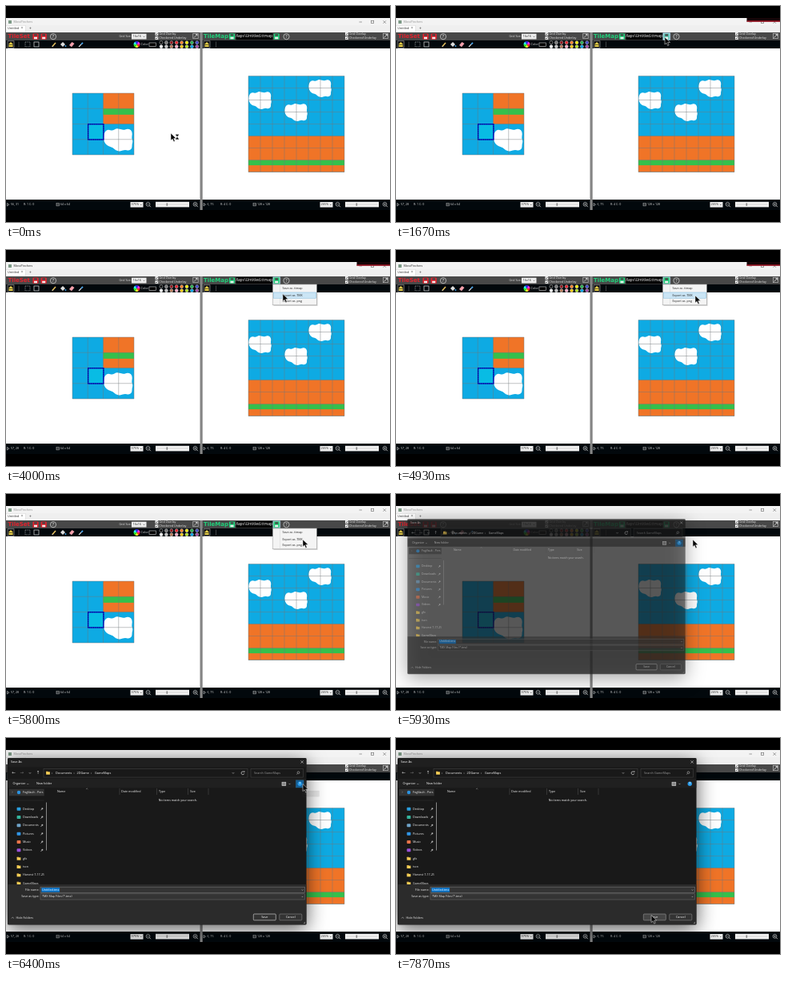
These frames come from a looping animation (480 by 270 pixels, 8 s). An HTML page with a canvas:

```html
<!DOCTYPE html>
<html lang="en">
<head>
<meta charset="utf-8">
<title>Tile editor export</title>
<style>
html, body { margin: 0; width: 100%; height: 100%; overflow: hidden; background: #000; }
canvas { display: block; width: 480px; height: 270px; }
</style>
</head>
<body>
<canvas id="stage"></canvas>
<script>
const LOOP = 8000, FPS = 15;
const UI = '"Open Sans", sans-serif', LOGO = '"DejaVu Sans", sans-serif';
const SKY = '#0eaae3', SOIL = '#f07427', GRASS = '#35bf4c', RED = '#e3202c', GREEN = '#1fd07a', BAR = '#02080c';
const canvas = document.getElementById('stage');
const c = canvas.getContext('2d');
const dpr = window.devicePixelRatio || 1;
canvas.width = 480 * dpr;
canvas.height = 270 * dpr;

function box(x, y, w, h, fill, stroke, lw = 0.6) {
  if (fill) { c.fillStyle = fill; c.fillRect(x, y, w, h); }
  if (stroke) { c.strokeStyle = stroke; c.lineWidth = lw; c.strokeRect(x, y, w, h); }
}
function round(x, y, w, h, r, fill, stroke) {
  c.beginPath();
  c.roundRect(x, y, w, h, r);
  if (fill) { c.fillStyle = fill; c.fill(); }
  if (stroke) { c.strokeStyle = stroke; c.lineWidth = 0.6; c.stroke(); }
}
function text(s, x, y, color = '#fff', size = 3.8, align = 'left', font = UI, weight = 400) {
  c.font = `${weight} ${size}px ${font}`;
  c.textAlign = align;
  c.textBaseline = 'middle';
  c.fillStyle = color;
  c.fillText(s, x, y);
}
function line(color, lw, ...p) {
  c.strokeStyle = color;
  c.lineWidth = lw;
  c.beginPath();
  for (let i = 0; i < p.length; i += 2) c.lineTo(p[i], p[i + 1]);
  c.stroke();
}
function disc(x, y, r, fill, stroke, lw = 0.7) {
  c.beginPath();
  c.arc(x, y, r, 0, 7);
  if (fill) { c.fillStyle = fill; c.fill(); }
  if (stroke) { c.strokeStyle = stroke; c.lineWidth = lw; c.stroke(); }
}
function poly(fill, ...p) {
  c.fillStyle = fill;
  c.beginPath();
  for (let i = 0; i < p.length; i += 2) c.lineTo(p[i], p[i + 1]);
  c.closePath();
  c.fill();
}
const chevron = (x, y, color, s = 1.2) => line(color, 0.6, x - s, y - s / 2, x, y + s / 2, x + s, y - s / 2);

// Artwork
const PUFF = [[.01, .38], [.06, .23], [.16, .18], [.3, .22], [.43, .14], [.56, .17], [.68, .2], [.78, .15], [.91, .19],
  [.95, .32], [.92, .45], [.97, .57], [.93, .67], [.94, .79], [.83, .87], [.7, .83], [.57, .89], [.4, .86],
  [.32, .76], [.18, .73], [.07, .65], [.01, .5]];
function cloud(x, y, s) {
  const n = PUFF.length, at = i => [x + PUFF[i % n][0] * s, y + PUFF[i % n][1] * s];
  c.fillStyle = '#fff';
  c.beginPath();
  for (let i = 0; i <= n; i++) {
    const [ax, ay] = at(i), [bx, by] = at(i + 1);
    c.quadraticCurveTo(ax, ay, (ax + bx) / 2, (ay + by) / 2);
  }
  c.fill();
}
function grid(x, y, size, n) {
  for (let i = 0; i <= n; i++) {
    const d = size * i / n;
    line('rgba(112,118,122,.75)', 0.6, x + d, y, x + d, y + size);
    line('rgba(112,118,122,.75)', 0.6, x, y + d, x + size, y + d);
  }
}
function tileSet() {
  const x = 83, y = 109, s = 77, t = s / 4;
  box(x, y, s, s, SKY);
  box(x + 2 * t, y, 2 * t, 2 * t, SOIL);
  box(x + 2 * t, y + t, 2 * t, 7.6, GRASS);
  cloud(x + 2 * t, y + 2 * t, 2 * t);
  grid(x, y, s, 4);
  box(x + t + .4, y + 2 * t + .2, t, t, '#08bce4', '#0614c8', 1.4);
  c.setLineDash([1, 1.4]);
  box(x + t + .4, y + 2 * t + .2, t, t, null, '#04086a', 1);
  c.setLineDash([]);
}
function tileMap() {
  const x = 303, y = 87.5, s = 120, t = s / 8;
  box(x, y, s, s, SKY);
  box(x, y + 5 * t, s, 3 * t, SOIL);
  box(x, y + 7 * t + .2, s, 6.4, GRASS);
  cloud(x, y + t, 2 * t);
  cloud(x + 3 * t, y + 2 * t, 2 * t);
  cloud(x + 5 * t, y, 2 * t);
  grid(x, y, s, 8);
}

// Editor window
function floppy(x, y, color) {
  round(x - 3.6, y - 3.6, 7.2, 7.2, 1, color);
  box(x - 1.9, y - 3, 3.8, 2.3, '#444');
  box(x - 2, y + .6, 4, 2.4, '#eee');
}
function help(x, y) {
  disc(x, y, 3.6, null, '#ddd', .7);
  text('?', x, y + .1, '#eee', 5.5, 'center');
}
function options(x) {
  ['Grid Overlay', 'Checkered Underlay'].forEach((s, i) => {
    const y = 35 + i * 5;
    box(x, y - 1.9, 3.8, 3.8, '#f4f4f4');
    line('#222', .6, x + .8, y, x + 1.6, y + 1, x + 3, y - 1);
    text(s, x + 5, y, '#eee', 3.6);
  });
}
function expand(x) {
  box(x - 3.2, 34.3, 6.4, 6.4, null, '#ccc', .6);
  line('#eee', .7, x - 2, 39.5, x + 2, 35.5);
  line('#eee', .7, x, 35.5, x + 2, 35.5, x + 2, 37.5);
}
function stamp(x) {
  box(x - 4, 43.8, 8, 8.6, '#111', '#aaa', .6);
  poly('#e7d04a', x - 3, 48, x, 45, x + 3, 48);
  box(x - 2.6, 48.6, 5.2, 2.4, '#e7d04a');
}
function zoom(x, sign) {
  disc(x, 247.8, 2.4, null, '#ccc', .7);
  line('#ccc', .9, x + 1.8, 249.6, x + 3.4, 251.2);
  line('#ccc', .6, x - 1.2, 247.8, x + 1.2, 247.8);
  if (sign > 0) line('#ccc', .6, x, 246.6, x, 249);
}
function status(x, pos, cell, cellX, size, sizeX, pct, pctX) {
  line('#ccc', .6, x + 1.5, 246.4, x + 4, 248.2, x + 1.5, 250, x + 1.5, 246.4);
  text(pos, x + 6, 248.3, '#ddd', 3.6);
  text(cell, cellX, 248.3, '#ddd', 3.6);
  box(sizeX, 246.5, 3.6, 3.4, null, '#ccc', .5);
  line('#ccc', .5, sizeX, 248.2, sizeX + 3.6, 248.2);
  text(size, sizeX + 5, 248.3, '#ddd', 3.6);
  box(pctX, 245, 16, 6.6, '#eee');
  text(pct, pctX + 1, 248.4, '#222', 3.8);
  chevron(pctX + 13.3, 248.3, '#333', 1);
  zoom(pctX + 22, -1);
  box(pctX + 31.5, 244.8, 42, 6.6, '#f2f2f2');
  line('#c4c4c4', .7, pctX + 33, 248, pctX + 72, 248);
  box(pctX + 45, 246.4, 1.6, 3.4, '#888');
  zoom(pctX + 81, 1);
}
const PALETTE = ['#000', '#777', '#8b1018', '#e8222b', '#ff7f27', '#fff200', '#22b14c', '#3f48cc',
  '#fff', '#c3c3c3', '#b97a57', '#ffaec9', '#ffc90e', '#b5e61d', '#00a2e8', '#a349a4'];

function toolIcons() {
  c.setLineDash([1, .8]);
  box(24, 45, 6, 6, null, '#ccc', .6);
  c.setLineDash([]);
  box(35, 45, 6, 6, null, '#ddd', .7);
  line('#e4c060', 1.6, 58, 50.5, 62, 46);
  line('#eee', .8, 57.5, 51, 58.5, 50);
  poly('#ddd', 68, 48, 71, 45, 74, 48, 71, 51);
  disc(74.5, 50, .9, '#3aa0e8');
  poly('#f3a0ac', 79, 49, 82.5, 45, 85.5, 47, 82, 51.2);
  line('#ddd', 1.1, 91, 51, 94, 48);
  line('#4aa4ea', 1.8, 94, 48, 96, 45.8);
}

function editor(t) {
  const active = t >= 2600 && t < 5660;
  const rec = t >= 330 && t < 5660;
  const menu = t >= 2660 && t < 5925;
  const hover = t >= 1300 && t < 2660;

  box(0, 15, 480, 9, '#f3f3f3');
  box(0, 24, 480, 9, '#efefef');
  box(3, 18, 4, 4, '#7d9a86');
  text('MossPinchers', 9.5, 20.2, active ? '#222' : '#909090', 3.7);
  line('#666', .6, 441.5, 20, 445, 20);
  box(456.5, 18.3, 3.2, 3.2, null, '#666', .6);
  line('#666', .6, 471.5, 18.3, 475, 21.8);
  line('#666', .6, 471.5, 21.8, 475, 18.3);
  if (rec) {
    box(438.5, 15, 41.5, 4.6, '#160508');
    box(438.5, 18.4, 41.5, 1.2, '#c01428');
  }
  box(0, 24.3, 24.5, 8.7, '#fff', '#ccc', .4);
  text('Untitled', 2, 28.4, '#222', 3.8);
  text('×', 20, 28.2, '#555', 4.5, 'center');
  text('+', 30.5, 28.2, '#333', 5, 'center');

  box(0, 33, 480, 10, '#484848');
  box(0, 43, 480, 10, BAR);
  box(0, 53, 480, 189, '#fff');
  box(0, 242, 480, 13, BAR);
  box(242.5, 33, 3.2, 222, '#858585');

  text('TileSet', 2.5, 38.3, RED, 7, 'left', LOGO, 700);
  floppy(37, 38.2, RED);
  floppy(47.2, 38.2, RED);
  help(59, 38.2);
  text('Grid Size:', 141.5, 38.2, '#ddd', 3.5);
  box(157, 34.7, 18.5, 6.8, '#eee');
  text('16x16', 158.5, 38.2, '#222', 3.8);
  chevron(172.5, 38.2, '#333', 1);
  options(186.5);
  expand(237);

  text('TileMap', 247, 38.3, GREEN, 7, 'left', LOGO, 700);
  floppy(282.5, 38.2, GREEN);
  c.save();
  box(287.5, 34, 46, 8.3, '#000');
  c.beginPath();
  c.rect(287.5, 34, 45.5, 8.3);
  c.clip();
  text('\\Maps\\Untitled.ttmap', 333, 38.2, '#fff', 4.9, 'right');
  c.restore();
  if (hover || menu) box(333.8, 33.8, 9, 8.6, hover ? '#c6e6f5' : '#a9d9c5', '#8cc0dc', .5);
  floppy(338.2, 38.2, hover ? '#5bc8b4' : GREEN);
  help(350.5, 38.2);
  options(424);
  expand(474.5);

  stamp(6);
  line('#666', .6, 16, 44.5, 16, 52);
  toolIcons();
  for (let i = 0; i < 6; i++) {
    c.beginPath();
    c.moveTo(163.5, 48);
    c.arc(163.5, 48, 4, i * Math.PI / 3, (i + 1) * Math.PI / 3);
    c.fillStyle = `hsl(${i * 60},85%,55%)`;
    c.fill();
  }
  text('Color', 168.5, 48.1, '#ddd', 3.8);
  box(179, 46, 8.5, 4.6, '#000', '#ccc', .6);
  PALETTE.forEach((p, i) => disc(194 + i % 8 * 6.4, i < 8 ? 45.7 : 50.7, 2, p, '#ddd', .5));
  stamp(251);
  line('#666', .6, 262.5, 44.5, 262.5, 52);

  tileSet();
  tileMap();
  status(0, t < 130 ? '56, 31' : '57, 28', 'R: 1 C: 0', 22, '64 x 64', 63, '375%', 155.5);
  status(245.5, '6, 75', 'R: 4 C: 0', 268, '128 x 128', 309, '265%', 392.5);
  if (menu) exportMenu(t);
}

function exportMenu(t) {
  box(334.5, 44, 55, 26, 'rgba(0,0,0,.18)');
  box(333.5, 43, 54.8, 25.8, '#f4f4f4', '#a5a5a5', .6);
  line('#d8d8d8', .5, 342.5, 43.5, 342.5, 68.5);
  if (t >= 3660 && t < 5660) box(334.3, 53, 53.4, 7.2, '#cbe5f5', '#7db6da', .5);
  ['Save as .ttmap', 'Export as .TMX', 'Export as .png'].forEach((s, i) =>
    text(s, 345.5, [47.7, 56.6, 64][i], '#222', 3.7));
}

// Save dialog
function folder(x, y) {
  box(x - 2.4, y - 2, 2.4, 1.2, '#e0a830');
  box(x - 2.4, y - 1.4, 4.8, 3.4, '#f6cf57');
}
const PLACES = [['Desktop', '#2a9fe0'], ['Downloads', '#35b49c'], ['Documents', '#6fa3c8'], ['Pictures', '#3196e6'],
  ['Music', '#e8744a'], ['Videos', '#9a50d8'], ['gfx'], ['tscn'], ['Harvest 7-17-25'], ['GameMaps']];

function sidebar() {
  c.save();
  c.beginPath();
  c.rect(2, 62, 45.7, 121);
  c.clip();
  box(4, 63.7, 45, 8.6, '#333');
  text('›', 8, 67.6, '#aaa', 4.5, 'center');
  disc(16, 68, 2.2, '#2a92e0');
  text('FogVault - Pers', 21, 68, '#eee', 3.7);
  line('#333', .5, 4, 78, 48, 78);
  PLACES.forEach(([name, color], i) => {
    const y = 88.7 + i * 10.33;
    if (color) {
      round(13.6, y - 2, 4.8, 4, .8, color);
      line('#bbb', .8, 43.5, y + 1.6, 45.2, y - .2);
      disc(45.4, y - .5, 1, '#bbb');
    } else folder(16, y);
    text(name, 21, y, '#eee', 3.7);
  });
  c.restore();
  box(50, 80.5, 1, 60, '#888');
}

function dialog(t) {
  const k = Math.round((t - 5933) * FPS / 1000);
  const scale = [.93, .976, .99, .997][k] || 1;
  c.save();
  c.globalAlpha = k < 1 ? .55 : 1;
  c.translate(178, 114);
  c.scale(scale, scale);
  c.translate(-178, -114);
  c.shadowColor = 'rgba(0,0,0,.65)';
  c.shadowBlur = 24 * dpr;
  c.shadowOffsetY = 5 * dpr;
  round(2, 25, 373.5, 208.5, 1.5, '#191919');
  c.shadowColor = 'transparent';
  c.shadowBlur = c.shadowOffsetY = 0;
  box(2.3, 25.4, 373, 11, '#1f1f1f');
  text('Save As', 6, 30.2, '#fff', 3.9);
  line('#ddd', .6, 368.5, 28.3, 371.8, 31.6);
  line('#ddd', .6, 368.5, 31.6, 371.8, 28.3);

  ['←', '→', '', '↑'].forEach((s, i) => text(s, 9.5 + i * 10.2, 43.6, i === 1 ? '#777' : '#ddd', 5.5, 'center', LOGO));
  chevron(30, 43.8, '#ccc');
  box(47, 38.3, 255, 10.8, '#191919', '#444');
  folder(52.5, 43.7);
  [['›', 57], ['Documents', 62], ['›', 84.5], ['2DGame', 88.5], ['›', 106], ['GameMaps', 111]].forEach(
    ([s, x]) => text(s, x, 43.7, '#fff', 3.8));
  chevron(284, 43.8, '#ccc');
  c.beginPath();
  c.arc(296, 43.8, 1.9, .3, 5.6);
  c.strokeStyle = '#ddd';
  c.lineWidth = .7;
  c.stroke();
  poly('#ddd', 297, 41.4, 298.6, 41.6, 298, 43.2);
  box(306, 38.3, 65.5, 10.8, '#191919', '#444');
  text('Search GameMaps', 310, 43.7, '#999', 3.8);
  disc(365.5, 43.2, 1.4, null, '#bbb', .6);
  line('#bbb', .6, 364.5, 44.3, 363.3, 45.6);

  box(2.3, 51, 373, 11.2, '#202020');
  text('Organize', 8.5, 57.5, '#fff', 3.8);
  chevron(27.3, 57.6, '#ccc', .9);
  text('New folder', 38, 57.5, '#fff', 3.8);
  box(345, 55.2, 4.8, 4.4, '#888', '#ddd', .6);
  chevron(354.5, 57.4, '#ccc', 1);
  if (t < 6600) box(362.6, 52.9, 9.4, 9, '#135c94', '#2474a4', .5);
  disc(367.3, 57.3, 2.7, '#2a9be8');
  text('?', 367.3, 57.3, '#fff', 3.8, 'center', UI, 700);

  sidebar();
  [['Name', 64], ['Date modified', 144], ['Type', 191], ['Size', 230]].forEach(([s, x]) => text(s, x, 67, '#eee', 3.7));
  [142, 188.5, 227.5, 253].forEach(x => line('#555', .5, x, 62.8, x, 71));
  line('#aaa', .5, 100, 64, 101.2, 63, 102.4, 64);
  text('No items match your search.', 214.8, 78, '#fff', 3.6, 'center');

  box(2.3, 183, 373, 50, '#2b2b2b');
  text('File name:', 41.5, 190, '#eee', 3.7, 'right');
  text('Save as type:', 41.5, 198.3, '#eee', 3.7, 'right');
  box(43, 186.2, 330.5, 7.4, '#343434', '#777');
  box(43, 194.8, 330.5, 7.2, '#343434', '#666');
  box(44.3, 187.2, 22.8, 5.4, '#0b78d0');
  text('Untitled.tmx', 45, 189.9, '#fff', 3.7);
  text('TMX Map Files (*.tmx)', 45, 198.3, '#eee', 3.7);
  chevron(370.5, 190, '#bbb', .9);
  chevron(370.5, 198.4, '#bbb', .9);
  line('#ccc', .6, 7, 225.4, 8.4, 224, 9.8, 225.4);
  text('Hide Folders', 12.5, 224.8, '#eee', 3.7);
  const over = t >= 7790;
  round(309.3, 220, 28, 7.8, 1, over ? '#454545' : '#333', over ? '#999' : '#ddd');
  text('Save', 323.3, 223.9, '#fff', 3.8, 'center');
  round(341.8, 220, 28, 7.8, 1, '#333', '#888');
  text('Cancel', 355.8, 223.9, '#fff', 3.8, 'center');
  poly('#777', 374, 229.5, 374, 232, 371.5, 232);
  c.restore();
}

function tooltip(t) {
  c.save();
  c.globalAlpha = Math.min(1, .1 + (t - 6400) / 270);
  box(371, 66, 20.5, 7.2, '#2b2b2b', '#777', .5);
  text('Get help.', 373, 69.7, '#fff', 3.6);
  c.restore();
}

// Pointer: time, x, y
const PATH = [[0, 206, 159], [600, 268, 112], [800, 268, 112], [1330, 338, 41], [1470, 338, 41], [1670, 336, 39],
  [3270, 336, 39], [4000, 346, 55], [4130, 346, 55], [4930, 374, 57], [5130, 377, 57], [5330, 371, 56.5],
  [6400, 371, 57.5], [7200, 383, 160], [7530, 376, 193], [7670, 376, 193], [7870, 319, 221.5], [8000, 319, 221.5]];

function pointer(t) {
  const i = PATH.findIndex(p => p[0] > t);
  const [t0, x0, y0] = PATH[i - 1], [t1, x1, y1] = PATH[i];
  const u = (t - t0) / (t1 - t0), e = u * u * (3 - 2 * u);
  c.save();
  c.translate(x0 + (x1 - x0) * e, y0 + (y1 - y0) * e);
  c.beginPath();
  for (const [x, y] of [[0, 0], [0, 9], [2.1, 7.2], [3.7, 10.6], [5.2, 9.9], [3.7, 6.6], [6.6, 6.4]]) c.lineTo(x, y);
  c.closePath();
  c.fillStyle = '#050505';
  c.fill();
  c.strokeStyle = '#f4f4f4';
  c.lineWidth = .5;
  c.stroke();
  if (t < 590) {
    poly('#111', 6.4, 2, 9.6, 2, 8, 4.6);
    poly('#111', 6.4, 7.2, 9.6, 7.2, 8, 4.6);
    line('#111', .8, 6, 2, 10, 2);
    line('#111', .8, 6, 7.2, 10, 7.2);
  }
  c.restore();
}

function draw(now) {
  const t = Math.floor((now % LOOP) * FPS / 1000 + .06) * 1000 / FPS % LOOP;
  c.setTransform(dpr, 0, 0, dpr, 0, 0);
  box(0, 0, 480, 270, '#000');
  editor(t);
  if (t >= 5925) dialog(t);
  if (t >= 6400 && t < 6800) tooltip(t);
  pointer(t);
}
const start = performance.now();
function tick() {
  draw(performance.now() - start);
  requestAnimationFrame(tick);
}
tick();
</script>
</body>
</html>
```
